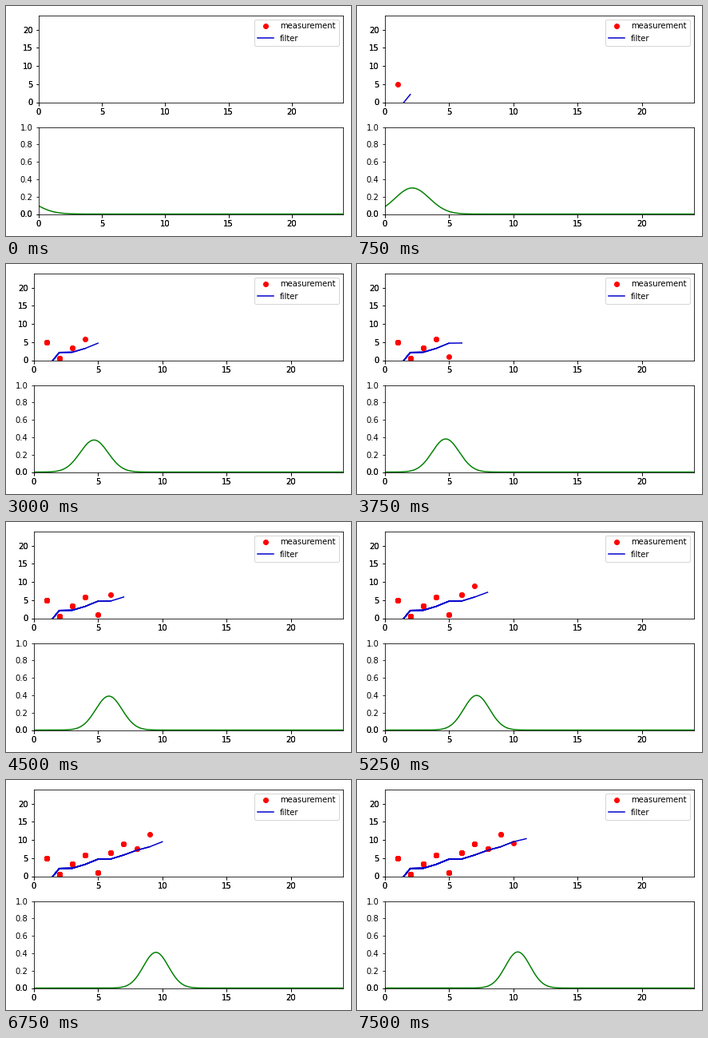
A matplotlib script that plays this animation: 432 px wide and 288 px high, repeating every 8 s.

```python
import numpy as np
import matplotlib.pyplot as plt
from matplotlib.animation import FuncAnimation

W, H, DPI = 432, 288, 72
SPAN = 24
STEPS = 11
TICK_MS, TICKS_PER_STEP, TICKS = 250, 3, 32

measured = [5.05, 0.55, 3.5, 5.9, 1.0, 6.5, 9.0, 7.6, 11.6, 9.2]
estimate = [-2.2, 2.15, 2.2, 3.25, 4.7, 4.75, 5.85, 7.15, 8.1, 9.5, 10.35]

plt.rcParams.update({"font.family": "DejaVu Sans", "font.size": 10})
fig = plt.figure(figsize=(W / DPI, H / DPI), dpi=DPI, facecolor="white")


def make_axes(top_limit, y_ticks, ghost=False):
    ax = fig.add_axes([0, 0, 1, 1], label=f"{top_limit}-{ghost}")
    ax.set(xlim=(0, SPAN), ylim=(0, top_limit),
           xticks=range(0, SPAN, 5), yticks=y_ticks)
    if ghost:
        ax.set_frame_on(False)
        ax.set_zorder(-1)
    return ax


def place(ax, left, top, bottom):
    right = 421.5
    ax.set_position([left / W, 1 - bottom / H,
                     (right - left) / W, (bottom - top) / H])


def density(x, step):
    var = 0.7 + 1 / (0.54 + 0.39 * step)
    offset = x - estimate[step]
    return np.exp(-offset ** 2 / (2 * var)) / np.sqrt(2 * np.pi * var)


track = make_axes(SPAN, range(0, SPAN, 5))
belief = make_axes(1, np.linspace(0, 1, 6))
# Second set of labels printed over the first
track_ghost = make_axes(SPAN, range(0, SPAN, 5), ghost=True)
belief_ghost = make_axes(1, [0], ghost=True)
belief_ghost.set_yticklabels(["0.0"])

# Every step plots the whole history again, so older parts grow heavier
layers = []
for n in range(STEPS):
    dots, = track.plot(range(1, n + 1), measured[:n], "o", color="red",
                       label="measurement" if n == 0 else None)
    path, = track.plot(range(1, n + 2), estimate[:n + 1], color="mediumblue",
                       label="filter" if n == 0 else None)
    layers.append((dots, path))
track.legend(loc="upper right")

grid = np.linspace(0, SPAN, 481)
curve, = belief.plot(grid, density(grid, 0), color="green")


def draw(i):
    step = i // TICKS_PER_STEP
    left = 40.5 if step == 0 else 34.5
    for ax in (track, track_ghost):
        place(ax, left, 11.5, 120.5)
    for ax in (belief, belief_ghost):
        place(ax, left, 151.5, 260.5)
    for n, pair in enumerate(layers):
        for line in pair:
            line.set_visible(n <= step)
    curve.set_ydata(density(grid, step))
    return []


anim = FuncAnimation(fig, draw, frames=TICKS, interval=TICK_MS,
                     init_func=lambda: draw(0), repeat=True, repeat_delay=0)
plt.show()
```
